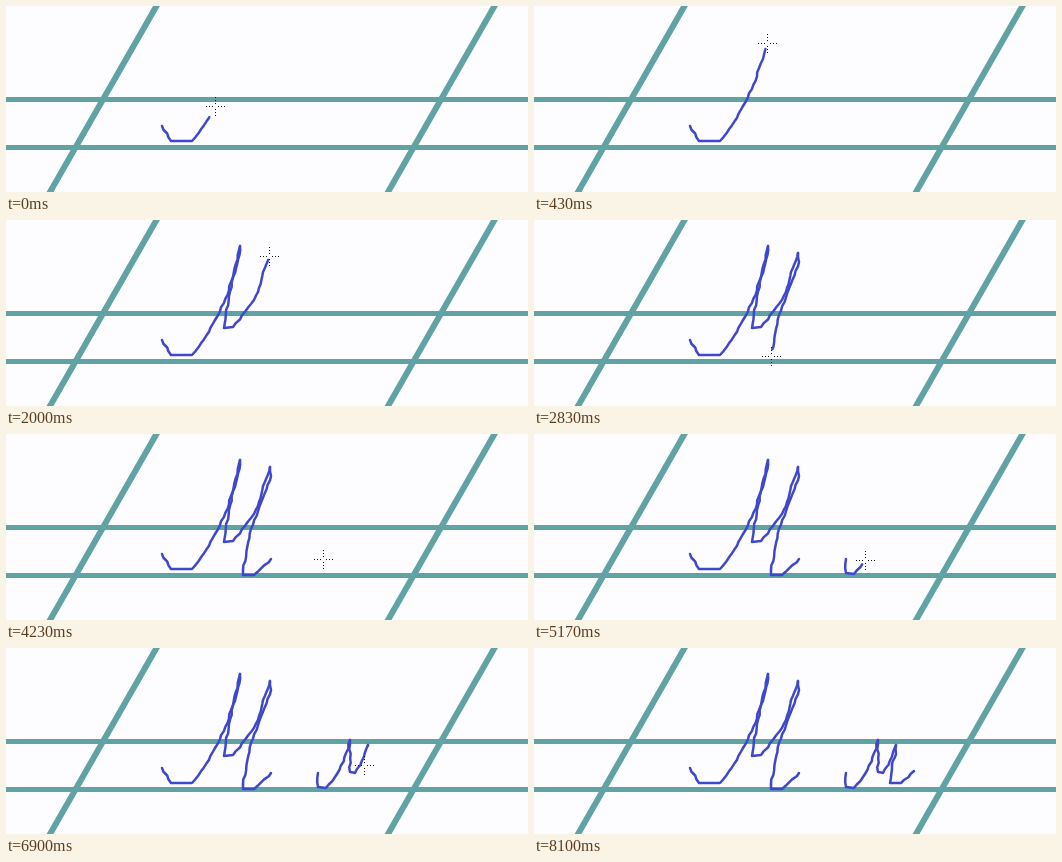
Animation of 522x186 px, one loop 9660 ms. Source, as an HTML page with a canvas:

```html
<!DOCTYPE html>
<html lang="en">
<head>
<meta charset="utf-8">
<title>Handwriting practice</title>
<style>
html, body { margin: 0; width: 100%; height: 100%; overflow: hidden; background: #fdfdff; }
canvas { display: block; }
</style>
</head>
<body>
<canvas id="stage" width="522" height="186"></canvas>
<script>
const LOOP = 9660, INK_LAG = 40, EXIT = 8090;
const PAPER = '#fdfdff', GUIDE = '#61a3a4', INK = '#3f48cc';
const ctx = document.getElementById('stage').getContext('2d');

let seed = 7;
const random = () => (seed = seed * 16807 % 2147483647) / 2147483647;
const mix = (a, b, k) => a + (b - a) * k;
const dist = (a, b) => Math.hypot(b[0] - a[0], b[1] - a[1]);

const moves = [];
let pen = [156, 120];

// A straight run as a hand makes it: rising lines bow right, all tremble a little
function handLine(a, b) {
  const steps = Math.ceil(dist(a, b) / 5);
  const rise = Math.max(0, a[1] - b[1]);
  return Array.from({ length: steps }, (_, i) => {
    const k = (i + 1) / steps;
    const bow = 0.16 * rise * k * (1 - k);
    const tremble = k < 1 ? (random() - 0.5) * 1.6 : 0;
    return [mix(a[0], b[0], k) + bow + tremble, mix(a[1], b[1], k)];
  });
}

// Moves the pen from its last place through the given turning points
function move(from, to, inked, ...turns) {
  const pts = [pen];
  for (const turn of turns) {
    pts.push(...handLine(pen, turn));
    pen = turn;
  }
  moves.push({ from, to, inked, pts });
}
const write = (from, to, ...turns) => move(from, to, true, ...turns);
const lift = (from, to, turn) => move(from, to, false, turn);

// Capital letter
write(-250, 0, [165, 135], [186, 135], [209, 100]);
write(0, 500, [225, 62], [234, 26]);
write(640, 1600, [223, 76], [218, 108], [227, 107], [252, 72]);
write(1640, 2030, [257, 52], [264, 33]);
write(2240, 2830, [265, 42], [245, 95], [237, 136]);
write(2830, 3300, [237, 141], [248, 141], [265, 125]);
lift(3470, 3830, [329, 114]);
lift(3940, 4230, [317, 125]);
lift(4300, 4430, [312, 125]);
// Small letter
write(4870, 5170, [312, 139], [320, 140], [331, 126]);
write(5170, 5600, [344, 92]);
write(5770, 6630, [344, 124], [349, 125], [362, 97]);
write(6860, 6900, [362, 106], [358, 117]);
write(6900, 7670, [356, 135], [367, 135], [380, 123]);
lift(7870, EXIT, [532, 86]);

// The part of a move's path covered by time t
function reached({ from, to, pts }, t) {
  const lengths = pts.slice(1).map((p, i) => dist(pts[i], p));
  let left = Math.min(1, (t - from) / (to - from)) * lengths.reduce((a, b) => a + b);
  const out = [pts[0]];
  for (let i = 0; i < lengths.length && left > 0; i++) {
    const k = Math.min(1, left / lengths[i]);
    out.push([0, 1].map(axis => mix(pts[i][axis], pts[i + 1][axis], k)));
    left -= lengths[i];
  }
  return out;
}

function line(pts, width, color) {
  ctx.beginPath();
  pts.forEach(p => ctx.lineTo(...p));
  ctx.lineWidth = width;
  ctx.strokeStyle = color;
  ctx.stroke();
}

function drawGuides() {
  for (const y of [93.5, 141.5]) line([[-5, y], [527, y]], 5, GUIDE);
  for (const x of [150.5, 488.5]) line([[x + 5.7, -10], [x - 112.2, 196]], 6, GUIDE);
}

function drawCursor(t) {
  const current = moves.filter(m => m.from <= t).pop();
  const [x, y] = reached(current, t).pop().map(Math.round);
  ctx.fillStyle = '#111';
  for (const side of [-1, 1]) {
    for (let d = 3; d <= 9; d += 3) {
      ctx.fillRect(x + side * d, y, 1, 1);
      ctx.fillRect(x, y + side * d, 1, 1);
    }
  }
}

function draw(t) {
  ctx.fillStyle = PAPER;
  ctx.fillRect(0, 0, 522, 186);
  ctx.lineCap = ctx.lineJoin = 'round';
  drawGuides();
  const inkTime = t - INK_LAG;
  for (const m of moves) {
    if (m.inked && m.from < inkTime) line(reached(m, inkTime), 2.5, INK);
  }
  if (t < EXIT) drawCursor(t);
}

const start = performance.now();
function frame() {
  draw((performance.now() - start) % LOOP);
  requestAnimationFrame(frame);
}
frame();
</script>
</body>
</html>
```
